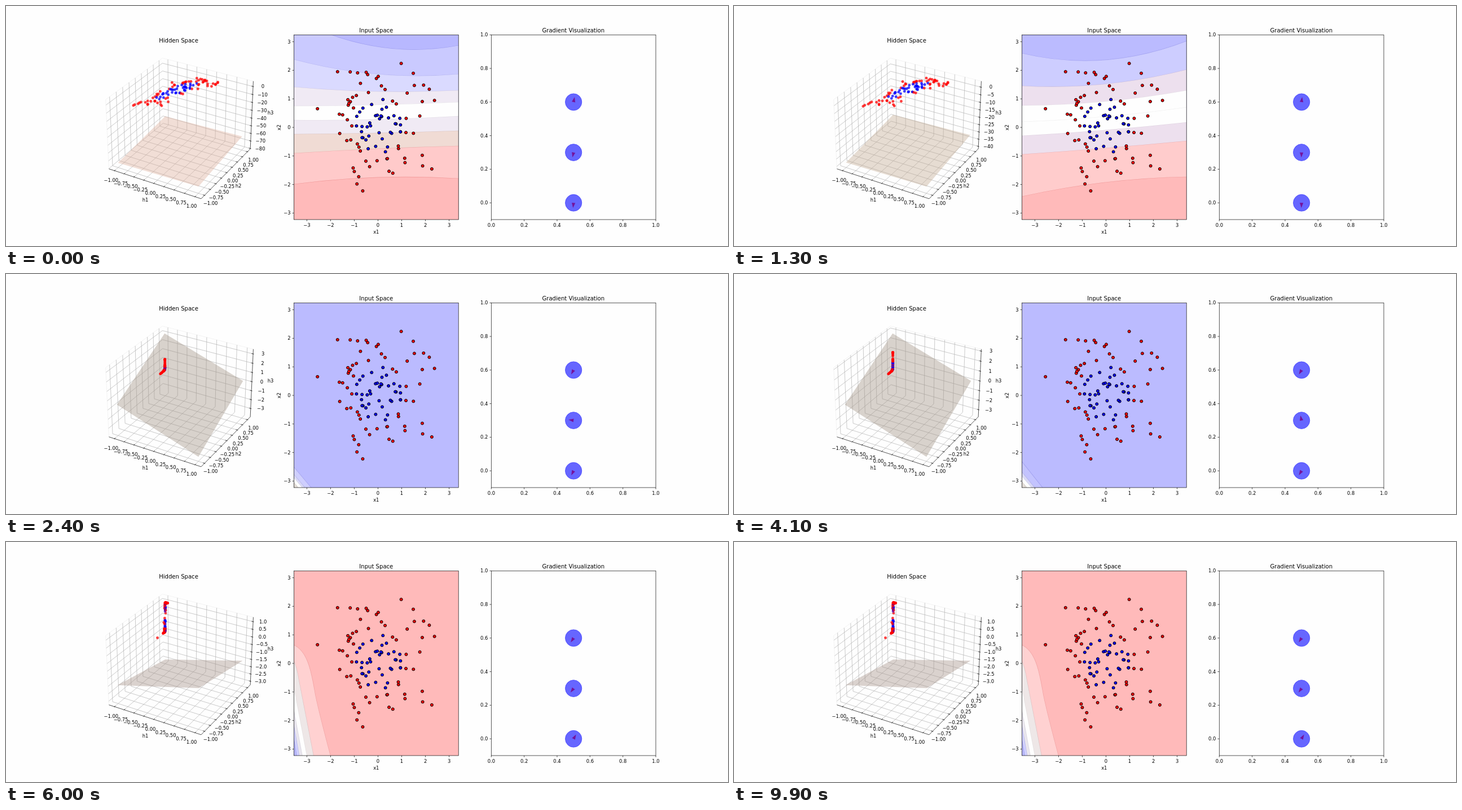
An HTML page with a canvas for the animation above (10000 ms loop, 1280 by 427 pixels).

```html
<!DOCTYPE html>
<html lang="en">
<head>
<meta charset="utf-8">
<title>Hidden space training</title>
<style>
html, body { margin: 0; width: 100%; height: 100%; overflow: hidden; background: #fefefe; }
canvas { display: block; }
</style>
</head>
<body>
<canvas id="stage" width="1280" height="427"></canvas>
<script>
const ctx = document.getElementById('stage').getContext('2d');
const LOOP = 10000, STEP = 100;
const PLOT = { l: 510.4, r: 802.2, t: 51.3, b: 380 };
const GRAD = { l: 860.3, r: 1152, t: 51.3, b: 380 };

const clamp = (v, a = 0, b = 1) => Math.min(b, Math.max(a, v));
const mix = (a, b, u) => Array.isArray(a) ? a.map((v, i) => mix(v, b[i], u)) : a + (b - a) * u;
const rgb = c => `rgb(${c.map(v => clamp(Math.round(v), 0, 255))})`;
const palette = s => s.split(' ').map(h => [0, 2, 4].map(i => parseInt(h.slice(i, i + 2), 16)));

// Mersenne Twister with polar Gaussian sampling
function gaussianSource(seed) {
  const mt = [seed >>> 0];
  for (let i = 1; i < 624; i++) {
    const p = mt[i - 1];
    mt[i] = (Math.imul(1812433253, p ^ (p >>> 30)) + i) >>> 0;
  }
  let index = 624, spare = null;
  function word() {
    if (index === 624) {
      for (let i = 0; i < 624; i++) {
        const y = (mt[i] & 0x80000000) | (mt[(i + 1) % 624] & 0x7fffffff);
        mt[i] = (mt[(i + 397) % 624] ^ (y >>> 1) ^ (y & 1 ? 0x9908b0df : 0)) >>> 0;
      }
      index = 0;
    }
    let y = mt[index++];
    y ^= y >>> 11;
    y ^= (y << 7) & 0x9d2c5680;
    y ^= (y << 15) & 0xefc60000;
    return (y ^ (y >>> 18)) >>> 0;
  }
  const uniform = () => {
    const a = word() >>> 5, b = word() >>> 6;
    return (a * 67108864 + b) / 9007199254740992;
  };
  return () => {
    if (spare !== null) { const v = spare; spare = null; return v; }
    let a, b, r;
    do { a = 2 * uniform() - 1; b = 2 * uniform() - 1; r = a * a + b * b; } while (r >= 1 || r === 0);
    const f = Math.sqrt(-2 * Math.log(r) / r);
    spare = f * a;
    return f * b;
  };
}

const gauss = gaussianSource(0);
const samples = Array.from({ length: 100 }, () => {
  const x = gauss(), y = gauss();
  return { x, y, color: x * x + y * y > 1 ? '#f00' : '#00f' };
});

// zlim: vertical limits; plane: offset and slopes as a share of the axis;
// weights: bias, x1, x2 of each hidden unit; angles: the three arrows in degrees
const EARLY = [
  { zlim: [-80.4, 6.6], plane: [.14, .014, .055], tint: [240, 221, 214],
    weights: [[-.21, .17, .21], [.15, .04, .62], [0, .1, .5]], angles: [78, -102, -96],
    curves: [[22, 72, 70], [95, 121, 121], [144, 152, 150], [178, 176, 171],
      [203, 202, 196], [228, 226, 222], [262, 254, 249], [317, 305, 307]],
    bands: palette('b8b8ff cacaff dadaff f0eaf4 fefefe f0eaf4 f0dbd4 ffcaca ffbaba') },
  { zlim: [-64.4, 5.4], plane: [.142, .014, .057], tint: [241, 217, 211],
    weights: [[-.2, .17, .21], [.2, .04, .62], [0, .1, .5]], angles: [79, -100, -95],
    curves: [[5, 35, 25], [67, 98, 85], [135, 141, 130], [175, 175, 165],
      [206, 201, 194], [236, 230, 222], [278, 267, 263], [410, 400, 395]],
    bands: palette('b8b8ff bbbbff d0d0ff f0e6f2 fefefe efe6f2 f2d8d2 ffbaba ffbaba') },
  { zlim: [-41.7, 3.9], plane: [.152, .012, .065], tint: [229, 220, 209],
    weights: [[-.17, .18, .21], [.27, .04, .62], [0, .1, .5]], angles: [83, -92, -92],
    curves: [[-20, 10, -15], [84, 96, 62], [142, 139, 113], [177, 170, 150],
      [206, 197, 180], [231, 221, 207], [264, 253, 240], [339, 314, 304]],
    bands: palette('b8b8ff bbbbff cdcdff ede0ee fefefe fefefe ede0ee ffcccc ffbaba') }
];
const MIDDLE = [
  { zlim: [-3.95, 3.5], plane: [.508, -.195, .246], tint: [216, 209, 203],
    weights: [[-4, 0, 0], [2.6, .6, .5], [-1.2, .4, .45]], angles: [-118, 172, -116] },
  { zlim: [-3.63, 3], plane: [.508, -.195, .246], tint: [216, 209, 203],
    weights: [[-4, 0, 0], [2.6, .6, .5], [-.8, .9, .8]], angles: [-122, 72, -125] }
];
const LATE = { zlim: [-3.25, 1.29], plane: [.329, .158, -.103], tint: [218, 210, 205],
  weights: [[-2.5, .35, .1], [3, .9, .15], [0, 2, 1.6]], angles: [-123, -126, 60] };

function mixState(a, b, u) {
  const s = {};
  for (const key in a) s[key] = mix(a[key], b[key], u);
  return s;
}

function stateAt(t) {
  if (t < 500) return mixState(EARLY[0], EARLY[1], t / 500);
  if (t < 2300) {
    const after = clamp((t - 1300) / 1000);
    const s = mixState(EARLY[1], EARLY[2], t < 1300 ? (t - 500) / 800 : 1 + .4 * after);
    if (after) s.angles = mix(EARLY[2].angles, [-118, -188, -116], after);
    return s;
  }
  if (t < 5400) {
    const s = mixState(MIDDLE[0], MIDDLE[1], clamp((t - 2400) / 2800));
    s.angles[1] = mix(172, 72, clamp((t - 3400) / 1000));
    return s;
  }
  return LATE;
}

// ---- drawing helpers ----
function line(points, color, width = .67) {
  ctx.beginPath();
  points.forEach(p => ctx.lineTo(p[0], p[1]));
  ctx.strokeStyle = color;
  ctx.lineWidth = width;
  ctx.stroke();
}

function disc(x, y, r, color) {
  ctx.beginPath();
  ctx.arc(x, y, r, 0, 7);
  ctx.fillStyle = color;
  ctx.fill();
}

function text(s, x, y, size = 8.4, align = 'center') {
  ctx.font = `${size}px "DejaVu Sans", sans-serif`;
  ctx.textAlign = align;
  ctx.textBaseline = 'alphabetic';
  ctx.fillStyle = '#000';
  ctx.fillText(s, x, y + size * .365);
}

const label = (v, digits) => v.toFixed(digits).replace(/^-(?=0\.?0*$)/, '').replace('-', '\u2212');

function frame(box, xs, ys, digits) {
  ctx.strokeStyle = '#000';
  ctx.lineWidth = .67;
  ctx.strokeRect(box.l, box.t, box.r - box.l, box.b - box.t);
  for (const [v, x] of xs) {
    line([[x, box.b], [x, box.b + 2.9]], '#000');
    text(label(v, digits), x, 390);
  }
  for (const [v, y] of ys) {
    line([[box.l - 2.9, y], [box.l, y]], '#000');
    text(label(v, digits), box.l - 5.9, y, 8.4, 'right');
  }
}

// ---- hidden space ----
const W = .5714, H = .4286, UNIT = .4987;

function project(x, y, z) {
  const depth = 10 - (.433 * x - .75 * y + .5 * z);
  return [310 + 1640 * (.866 * x + .5 * y) / depth,
    212 - 1640 * (-.25 * x + .433 * y + .866 * z) / depth, depth];
}

function drawHidden(s) {
  const [z0, z1] = s.zlim;
  const height = n => (n - .5) * 2 * H;
  const zOf = v => height((v - z0) / (z1 - z0));
  const path = (pts, color, width) => line(pts.map(p => project(...p)), color, width);
  const grid = '#b0b0b0';

  path([[-W, -W, -H], [-W, -W, H], [-W, W, H], [W, W, H]], '#eeeeee', .7);

  const ticks = Array.from({ length: 9 }, (_, i) => -1 + i * .25);
  const raw = (z1 - z0) / 9.15, mag = 10 ** Math.floor(Math.log10(raw));
  const step = [1, 2, 2.5, 5, 10].find(m => m * mag >= raw) * mag;
  const zTicks = [];
  for (let k = Math.ceil(z0 / step); k * step <= z1; k++) zTicks.push(k * step);

  for (const v of ticks) {
    const p = v * UNIT;
    path([[p, -W, -H], [p, W, -H], [p, W, H]], grid);
    path([[W, p, -H], [-W, p, -H], [-W, p, H]], grid);
  }
  for (const v of zTicks) path([[-W, -W, zOf(v)], [-W, W, zOf(v)], [W, W, zOf(v)]], grid);

  path([[-W, -W, -H], [W, -W, -H], [W, W, -H], [W, W, H]], '#000');
  for (const v of ticks) {
    const p = v * UNIT;
    path([[p, -W - .0095, -H], [p, -W + .019, -H]], '#000');
    path([[W + .0095, p, -H], [W - .019, p, -H]], '#000');
    const a = project(p, -W, -H), b = project(W, p, -H);
    text(label(v, 2), a[0] - 6, a[1] + 17);
    text(label(v, 2), b[0] + 10.5, b[1] + 14.5);
  }
  for (const v of zTicks) {
    const z = zOf(v), p = project(W, W, z);
    path([[W + .0095, W, z], [W - .019, W, z]], '#000');
    text(label(v, step < 1 ? 1 : 0), p[0] + 17.5, p[1]);
  }
  text('h1', 247, 345);
  text('h2', 412, 320);
  text('h3', 469, 190);

  // Translucent sheet whose blend over white equals the tint
  const [c, a, b] = s.plane, alpha = .4;
  ctx.beginPath();
  for (const [x, y] of [[-1, -1], [-1, 1], [1, 1], [1, -1]]) {
    const p = project(x * UNIT, y * UNIT, height(c + a * x + b * y));
    ctx.lineTo(p[0], p[1]);
  }
  ctx.globalAlpha = alpha;
  ctx.fillStyle = rgb(s.tint.map(v => 254 - (254 - v) / alpha));
  ctx.fill();

  const dots = samples.map(({ x, y, color }) => {
    const [h1, h2, h3] = s.weights.map(w => Math.tanh(w[0] + w[1] * x + w[2] * y));
    return { p: project(h1 * UNIT, h2 * UNIT, zOf(h3)), color };
  }).sort((m, n) => n.p[2] - m.p[2]);
  ctx.globalAlpha = .75;
  for (const { p, color } of dots) disc(p[0], p[1], 2.45, color);
  ctx.globalAlpha = 1;
  text('Hidden Space', 306, 61.5, 10.08);
}

// ---- input space ----
const px = x => 659.5 + 42.03 * x;
const py = y => 216 - 50.8 * y;

// Fills the region closed off at the given corners and marks its curved side.
function region(curve, corners, color) {
  const shape = new Path2D(curve);
  const edge = new Path2D(curve);
  corners.forEach(p => shape.lineTo(p[0], p[1]));
  ctx.fillStyle = color;
  ctx.fill(shape);
  ctx.save();
  ctx.globalCompositeOperation = 'multiply';
  ctx.lineWidth = .7;
  for (const [ink, alpha] of [[color, .6], ['#000', .06]]) {
    ctx.globalAlpha = alpha;
    ctx.strokeStyle = ink;
    ctx.stroke(edge);
  }
  ctx.restore();
}

function fillPlot(color) {
  ctx.fillStyle = color;
  ctx.fillRect(PLOT.l, PLOT.t, PLOT.r - PLOT.l, PLOT.b - PLOT.t);
}

const bottomLeft = [[505, 385]];

function drawStripes(s) {
  fillPlot(rgb(s.bands[0]));
  s.curves.forEach(([l, m, r], i) =>
    region(`M510 ${l}Q656 ${2 * m - (l + r) / 2} 803 ${r}`, [[803, 420], [510, 420]], rgb(s.bands[i + 1])));
}

function drawCorner(t) {
  const u = clamp((t - 2400) / 2800);
  fillPlot('#bbbbff');
  const yr = 52 + 147 * (t - 4400) / 800;
  if (yr > 52) region(`M510 ${yr - 188}L803 ${yr + .6}`, [[803, 40]], '#cacaff');
  const from = [[343, 541], [356, 530], [362, 525], [370, 518]];
  const to = [[327, 551], [349, 535], [358, 529], [368, 520]];
  const first = mix([206, 206, 253], [188, 188, 255], u);
  const colors = [rgb(first), '#d9d9f6', '#fdfdfd', '#e2dcd6'];
  mix(from, to, u).forEach(([y, x], i) => region(`M510 ${y}L${x} 380`, bottomLeft, colors[i]));
}

function drawPocket() {
  fillPlot('#ffbaba');
  region('M510 183C532 193 540 222 547 264Q551 289 575.5 381', bottomLeft, '#ffd1d1');
  region('M510 211Q516 224 519 244L545.5 381', bottomLeft, '#eee7e7');
  region('M510 257L533.5 381', bottomLeft, '#fefefe');
  region('M510 297L525.5 381', bottomLeft, '#e9e6ee');
  region('M510 324L520 381', bottomLeft, '#d0d0ff');
  region('M510 348L515.5 381', bottomLeft, '#b9b9ff');
}

function drawInput(t, s) {
  ctx.save();
  ctx.beginPath();
  ctx.rect(PLOT.l, PLOT.t, PLOT.r - PLOT.l, PLOT.b - PLOT.t);
  ctx.clip();
  if (t < 2300) drawStripes(s);
  else if (t < 5400) drawCorner(t);
  else drawPocket();
  ctx.restore();

  for (const { x, y, color } of samples) {
    disc(px(x), py(y), 2.5, color);
    ctx.strokeStyle = '#000';
    ctx.lineWidth = 1;
    ctx.stroke();
  }
  const ticks = [-3, -2, -1, 0, 1, 2, 3];
  frame(PLOT, ticks.map(v => [v, px(v)]), ticks.map(v => [v, py(v)]), 0);
  text('Input Space', 656.3, 43, 10.08);
  text('x1', 656.3, 402);
  ctx.save();
  ctx.translate(484, 216);
  ctx.rotate(-Math.PI / 2);
  text('x2', 0, 0);
  ctx.restore();
}

// ---- gradients ----
function drawGradients(s) {
  const gx = v => GRAD.l + v * (GRAD.r - GRAD.l);
  const gy = v => 350.2 - v * 298.9;
  s.angles.forEach((deg, i) => {
    const x = gx(.5), y = gy(.6 - .3 * i);
    ctx.beginPath();
    ctx.ellipse(x, y, 14.6, 14.9, 0, 0, 7);
    ctx.fillStyle = '#6666ff';
    ctx.fill();
    ctx.strokeStyle = '#4747ff';
    ctx.lineWidth = .84;
    ctx.stroke();
    ctx.save();
    ctx.translate(x, y);
    ctx.rotate(-deg * Math.PI / 180);
    ctx.fillStyle = '#74149c';
    ctx.fill(new Path2D('M9 0L0 -3.1L0 3.1Z'));
    ctx.restore();
  });
  const ticks = [0, .2, .4, .6, .8, 1];
  frame(GRAD, ticks.map(v => [v, gx(v)]), ticks.map(v => [v, gy(v)]), 1);
  text('Gradient Visualization', 1005.8, 43, 10.08);
}

function render(now) {
  const t = Math.floor((now % LOOP) / STEP) * STEP;
  const s = stateAt(t);
  ctx.fillStyle = '#fefefe';
  ctx.fillRect(0, 0, 1280, 427);
  drawHidden(s);
  drawInput(t, s);
  drawGradients(s);
}

const start = performance.now();
function tick() {
  render(performance.now() - start);
  requestAnimationFrame(tick);
}
tick();
</script>
</body>
</html>
```
